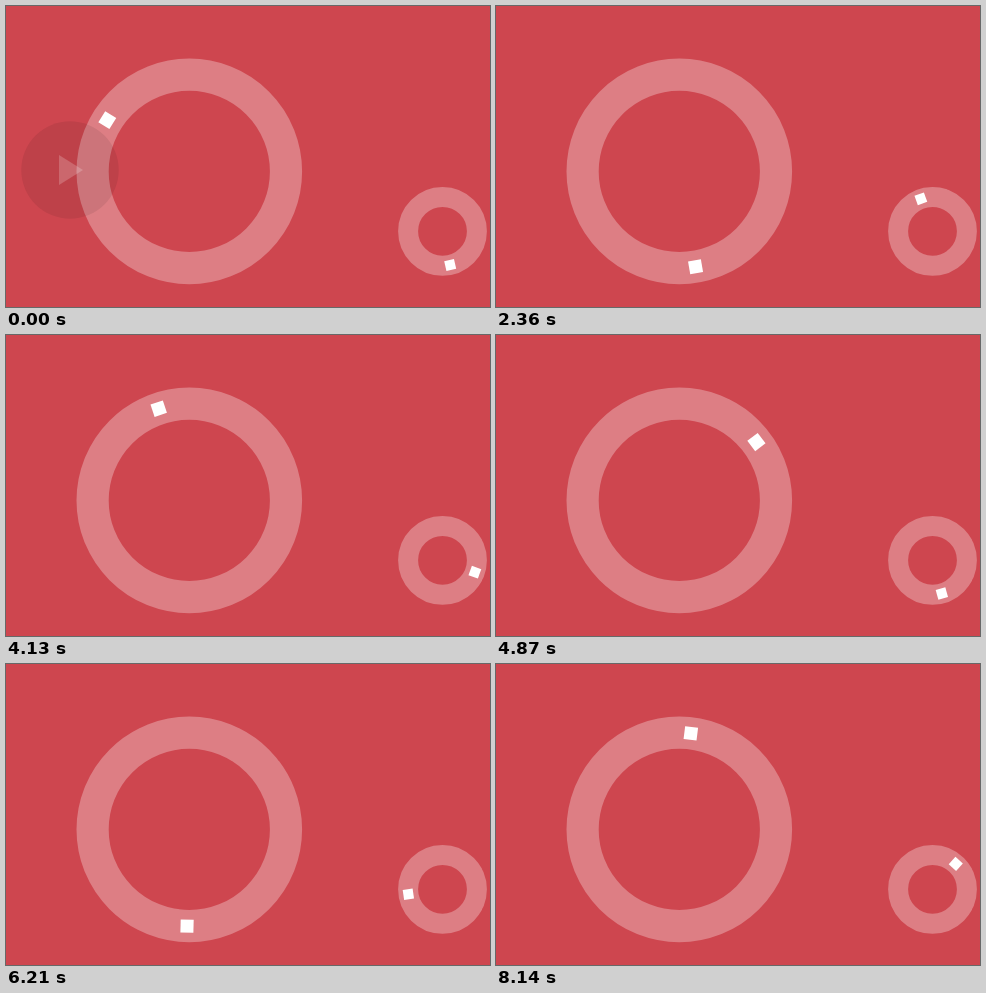
An HTML page that plays this animation: 484 by 301 pixels, repeating every 8240 ms.

```html
<!DOCTYPE html>
<html lang="en">
<head>
<meta charset="utf-8">
<title>Orbiting squares</title>
<style>
  html, body { margin: 0; height: 100%; overflow: hidden; background: #ce464f; }
  svg { display: block; width: 100%; height: 100%; }
  .ring { fill: none; stroke: #fff; stroke-opacity: .3; }
</style>
</head>
<body>
<svg viewBox="0 0 484 301">
  <circle class="ring" cx="183.3" cy="165.4" r="96.7" stroke-width="32.2"/>
  <circle class="ring" cx="436.5" cy="225.3" r="34.4" stroke-width="20"/>
  <g id="play">
    <circle cx="64" cy="164" r="48.7" fill-opacity=".08"/>
    <path d="M53 149L77 164L53 179Z" fill="#fff" fill-opacity=".2"/>
  </g>
  <rect id="big" x="90.2" y="-6.5" width="13" height="13" fill="#fff"/>
  <rect id="small" x="29.5" y="-5" width="10" height="10" fill="#fff"/>
</svg>
<script>
  const LOOP = 8240, STEPS = 56;
  const [play, big, small] = ['play', 'big', 'small'].map(id => document.getElementById(id));
  const start = performance.now();

  function orbit(square, x, y, angle) {
    square.setAttribute('transform', `translate(${x} ${y}) rotate(${angle})`);
  }

  function draw(now) {
    const t = Math.max(0, now - start) % LOOP;
    const step = Math.floor(t * STEPS / LOOP); // the motion ticks in even steps
    orbit(big, 183.3, 165.4, 212 + 14.27 * step);
    orbit(small, 436.5, 225.3, 77.1 + 10.824 * step);
    play.style.display = step ? 'none' : '';
    requestAnimationFrame(draw);
  }
  draw(start);
</script>
</body>
</html>
```
